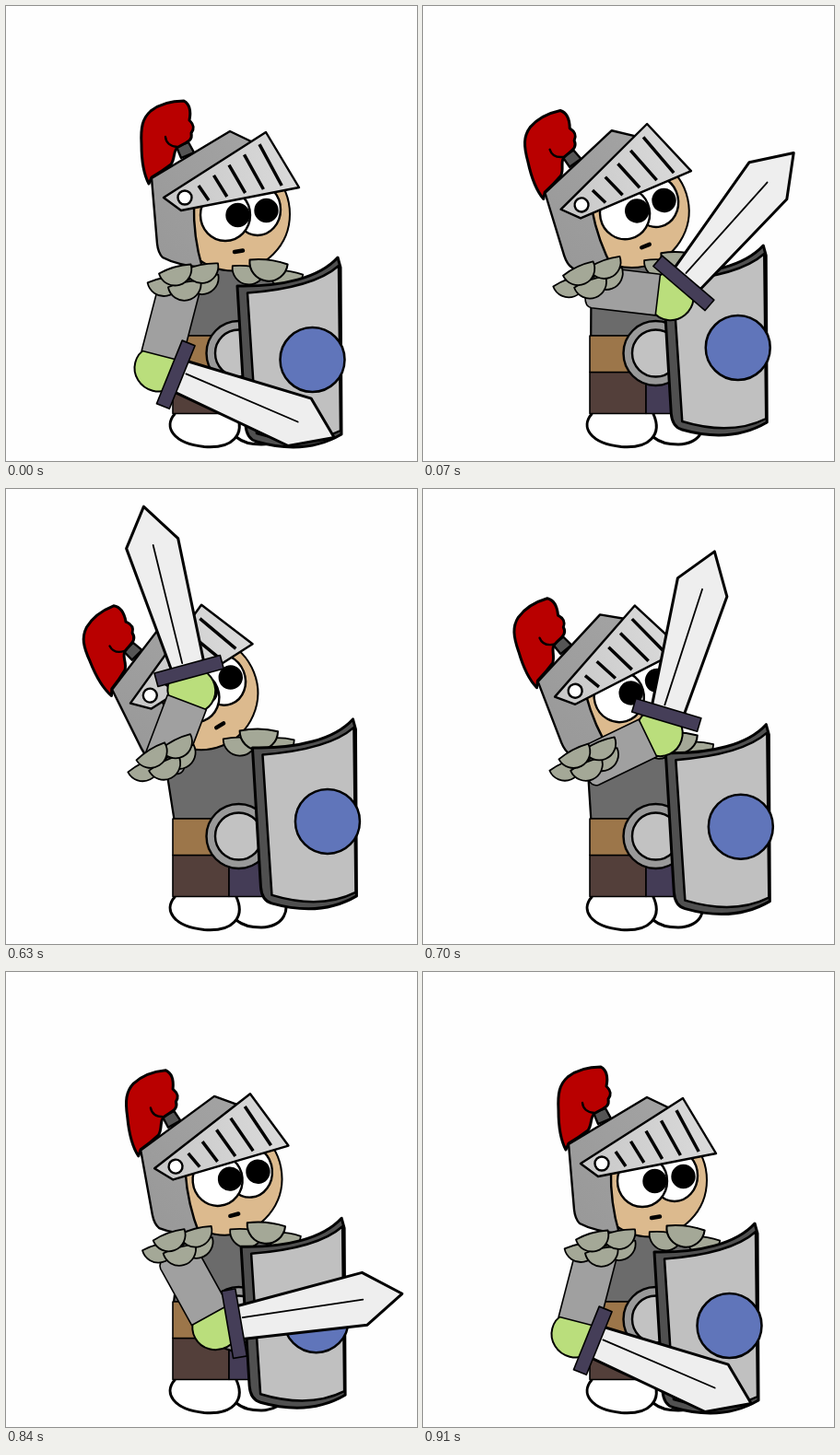
An HTML page that plays this animation: 446 px wide and 494 px high, repeating every 1680 ms.

```html
<!DOCTYPE html>
<html>
<head>
<meta charset="utf-8">
<style>
html, body { margin: 0; width: 100%; height: 100%; overflow: hidden; background: #fefefe }
svg { display: block; width: 446px; height: 494px }
</style>
</head>
<body>
<svg viewBox="0 0 446 494" stroke="#000" stroke-width="2" stroke-linejoin="round" stroke-linecap="round">
  <defs>
    <linearGradient id="steel" x1="0" y1="1" x2="1" y2="0">
      <stop stop-color="#989898"/><stop offset="1" stop-color="#a3a3a3"/>
    </linearGradient>
    <linearGradient id="bright">
      <stop stop-color="#c8c8c8"/><stop offset="1" stop-color="#dadada"/>
    </linearGradient>
    <path id="petal" d="M-18 0A18 18 0 0 0 18 0Q0 -4 -18 0Z"/>
  </defs>

  <g fill="#fff" stroke-width="3">
    <path d="M243 443C240 467 255 476 277 476C303 475 308 456 301 443"/>
    <path d="M183 443C171 457 181 475 215 478.500C246 481 260 465 250 443"/>
  </g>
  <g stroke-width="1.6">
    <path fill="#533f3a" d="M181 397.500h61v45h-61z"/>
    <path fill="#443c56" d="M242 397.500h48v45h-48z"/>
    <path id="torso" fill="#6b6b6b" stroke-width="2.200" d="M199 278H297L291 358H182Z"/>
    <path fill="#9c764a" d="M181 358h110v39.500h-110z"/>
  </g>
  <g stroke-width="2.400">
    <circle cx="252.500" cy="377" r="35" fill="#999"/>
    <circle cx="252.500" cy="377" r="25.500" fill="#c2c2c2"/>
  </g>

  <g id="head" stroke-width="2.400">
    <path fill="#555" d="M185 153L198 148L204 159L190 165Z"/>
    <path fill="#b90000" stroke-width="3" d="M155 193C148 180 147 165 147 150C146 132 148 122 157 114C166 107 177 103 193 103C200 107 201 114 199 124C205 130 204 134 201 138C203 147 195 148 187 153C181 156 184 165 179 172Q170 179 158 186Z"/>
    <path fill="none" d="M173 142Q174 152 186 153"/>
    <circle cx="246.500" cy="226" r="61.500" fill="#dcba8e" stroke-width="2"/>
    <ellipse cx="273" cy="221" rx="25" ry="28" fill="#fff"/>
    <ellipse cx="238" cy="227" rx="27" ry="28" fill="#fff"/>
    <circle cx="282.500" cy="222" r="12"/>
    <circle cx="251.500" cy="227" r="12"/>
    <path fill="none" stroke-width="4.500" d="M248 267L257 265.500"/>
    <path fill="url(#steel)" d="M158 187L243 136L268 148L204 215Q203 250 213 284Q185 281 170 273Q165 268 164 258Z"/>
    <path fill="url(#bright)" d="M171 208L282 137L318 197L190 222Z"/>
    <path id="slots" stroke-width="3.500" stroke-linecap="butt"/>
    <circle cx="194" cy="208" r="7.500" fill="#fff"/>
  </g>

  <g id="farPad" fill="#a4a897" stroke-width="1.8">
    <use href="#petal" x="-21.500"/>
    <use href="#petal" x="19.500"/>
    <use href="#petal" transform="translate(-1 -9) scale(1.15)"/>
  </g>
  <g id="shield" stroke-width="3">
    <path fill="#505050" d="M251 304C300 305 340 295 360 273L363 284L364 465Q325 488 272 473Q261 470 260 455Z"/>
    <path fill="#c0c0c0" stroke-width="2.500" d="M262 311.500Q334 306 361 282L363 461Q325 480 272 464Z"/>
    <circle cx="332.500" cy="384" r="35" fill="#6075ba" stroke-width="2.500"/>
  </g>
  <g id="arm">
    <ellipse cx="92" rx="25" ry="26" fill="#bade7c"/>
    <path fill="#a0a0a0" stroke-width="1.600" d="M0 -22.500H78V22.500H8Q1 22 0 12Z"/>
    <g id="sword">
      <path fill="#eee" stroke-width="3" d="M4 -18L146 -31L185 -1L142 26L4 18Z"/>
      <path fill="none" stroke-width="1.800" d="M10 -5L142 -2"/>
      <path fill="#453e58" stroke-width="1.600" d="M-7.500 -37h15v74h-15z"/>
    </g>
  </g>
  <g id="nearPad" fill="#a4a897" stroke-width="1.8">
    <use href="#petal" x="-21" y="2"/>
    <use href="#petal" x="20" y="8"/>
    <use href="#petal" x="0" y="11"/>
    <use href="#petal" x="22" y="-4"/>
    <use href="#petal" transform="translate(-7 -7) rotate(-5)"/>
  </g>
</svg>
<script>
const LOOP = 1680, STEP = 70, RAISED_UNTIL = 630;
const place = (id, transform) => document.getElementById(id).setAttribute('transform', transform);

let slots = '';
for (let i = 0; i < 5; i++)
  slots += `M${209 + 16.5 * i} ${195 - 11.2 * i}L${220 + 19.8 * i} ${211 - 4 * i}`;
document.getElementById('slots').setAttribute('d', slots);

// 0 = guard lowered, 1 = sword raised
function lift(t) {
  if (t < RAISED_UNTIL) return Math.min(1, Math.floor(t / STEP) / 2);
  const step = Math.floor((t - RAISED_UNTIL) / STEP);
  return Math.max(0, (8 - 2 * step) / 9);
}

function pose(p) {
  const lean = 0.415 * p;
  place('torso', `matrix(1 0 ${lean} 1 ${-357 * lean} 0)`);
  place('head', `translate(${-15 * p} ${-0.4 * p}) rotate(${-24.3 * p} 225 280)`);
  place('farPad', `translate(${285 - 11 * p} ${287 - 17 * p}) rotate(${7 - 7 * p})`);
  place('shield', `translate(${18.5 * p} ${-26 * p})`);
  place('arm', `translate(${188.5 - 22.2 * p} 304.4) rotate(${104.5 - 195.5 * p})`);
  place('sword', `translate(90.6 4.5) rotate(${-82.5 + 52.5 * p}) translate(24.6 0)`);
  place('nearPad', `translate(${191.5 - 28.5 * p} ${291 - 3.5 * p}) rotate(${-11 - 18 * p})`);
}

const start = performance.now();
function frame() {
  pose(lift((performance.now() - start) % LOOP));
  requestAnimationFrame(frame);
}
frame();
</script>
</body>
</html>
```
